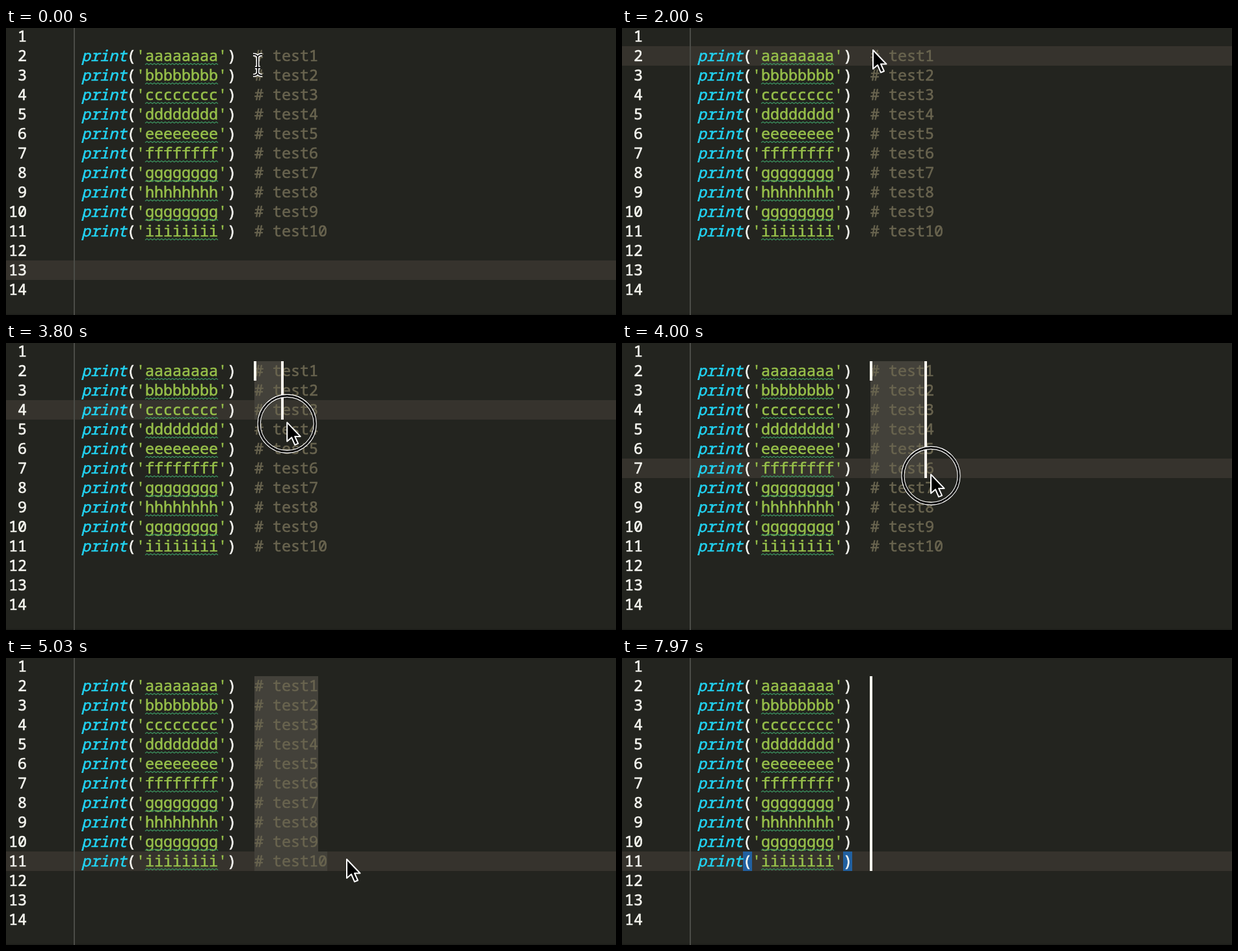
Animation of 938x442 px, one loop 8010 ms. Source, as an HTML page:

```html
<!DOCTYPE html>
<html>
<head>
<meta charset="utf-8">
<style>
  html, body { margin: 0; width: 100%; height: 100%; overflow: hidden; background: #23241f; }
  svg { display: block; width: 938px; height: 442px; }
  text {
    font: 23.333px "Noto Sans Mono", "DejaVu Sans Mono", monospace; white-space: pre;
    fill: currentColor; stroke: currentColor; stroke-width: 0.6;
  }
  .number, .paren { color: #f8f8f2; }
  .call { color: #22d3f2; font-style: italic; }
  .string { color: #97c04a; }
  .comment { color: #69644f; }
  .squiggle { fill: none; stroke: #3c9460; stroke-width: 1.1; }
</style>
</head>
<body>
<svg viewBox="0 0 938 442">
  <defs>
    <path id="beamShape" d="M-6 -12Q0 -12 1 -8Q2 -12 8 -12M1 -8V16M-6 20Q0 20 1 16Q2 20 8 20M-3 8H5"/>
  </defs>
  <rect width="938" height="442" fill="#23241f"/>
  <rect y="440" width="938" height="2" fill="#1e1f1b"/>
  <rect id="active" width="938" height="30" fill="#36332d"/>
  <path id="selection" fill="#43413a"/>
  <path id="brackets" d="M186 298h14v30h-14zM340 298h14v30h-14z" fill="#2160a0"/>
  <rect x="104" width="2" height="442" fill="#4b4c47"/>
  <g id="code"></g>
  <g id="comments"></g>
  <path id="carets" fill="#fcf7ee"/>
  <g id="ring" fill="none">
    <circle cy="3" r="43" stroke="#000" stroke-width="4"/>
    <circle cy="3" r="45" stroke="#fff" stroke-width="1.1"/>
    <circle cy="3" r="41" stroke="#fff" stroke-width="1.1"/>
  </g>
  <path id="arrow" d="M0 1V30L7 24L12 35.5L17 33.5L12 22.5H20.5Z" fill="#000" stroke="#fff" stroke-width="2" stroke-linejoin="round"/>
  <g id="beam" fill="none">
    <use href="#beamShape" stroke="#fff" stroke-width="5"/>
    <use href="#beamShape" stroke="#000" stroke-width="1.8"/>
  </g>
</svg>
<script>
const LOOP = 8010, CHAR = 14, ROW = 30, CODE_X = 116, COMMENT_X = 382;
const FIRST_ROW = 2, LAST_ROW = 11;
const CLICK = 500, CLICK_END = 950, ARROW_ON = 1500;
const PRESS = 3000, DRAG = 3400, DRAG_END = 4440, RELEASE = 4750;
const ARROW_OFF = 5300, ERASE = 5960;

const parts = Object.fromEntries(
  ['active', 'selection', 'brackets', 'code', 'comments', 'carets', 'ring', 'arrow', 'beam']
    .map(id => [id, document.getElementById(id)]));
const rowTop = row => row * ROW - 32;
const label = (kind, x, row, content) =>
  `<text class="${kind}" x="${x}" y="${rowTop(row) + 23}">${content}</text>`;
const box = (x, y, w, h) => `M${x} ${y}h${w}v${h}h${-w}z`;
const show = (part, on) => part.setAttribute('visibility', on ? 'visible' : 'hidden');
const clamp = (v, lo, hi) => Math.min(hi, Math.max(lo, v));

function buildText() {
  let code = '', comments = '';
  for (let row = 1; row <= 14; row++) {
    code += label('number', 32 - CHAR * String(row).length, row, row);
  }
  [...'abcdefghgi'].forEach((letter, i) => {
    const row = FIRST_ROW + i;
    code += label('call', CODE_X, row, 'print') +
      label('paren', CODE_X + 5 * CHAR, row, '(') +
      label('string', CODE_X + 6 * CHAR, row, `'${letter.repeat(8)}'`) +
      label('paren', CODE_X + 16 * CHAR, row, ')') +
      `<path class="squiggle" d="M214 ${rowTop(row) + 28.5}${'l2.8 -2l2.8 2'.repeat(20)}"/>`;
    comments += label('comment', COMMENT_X, row, `# test${i + 1}`);
  });
  parts.code.innerHTML = code;
  parts.comments.innerHTML = comments;
}

// Pointer stops: time, x, y
const stops = [
  [0, 386, 53], [300, 386, 33], [DRAG, 386, 33],
  [3800, 432, 121], [4230, 524, 293], [4400, 524, 309]
];
function pointerAt(t) {
  const next = stops.findIndex(s => s[0] > t);
  if (next < 0) return stops[stops.length - 1].slice(1);
  const a = stops[next - 1], b = stops[next], k = (t - a[0]) / (b[0] - a[0]);
  return [a[1] + (b[1] - a[1]) * k, a[2] + (b[2] - a[2]) * k];
}

// The selection trails the pointer slightly.
function selectionAt(t) {
  const [x, y] = pointerAt(t - 40);
  const row = clamp(Math.floor((y + 32) / ROW), FIRST_ROW, LAST_ROW);
  const column = Math.max(0, Math.round((x - COMMENT_X) / CHAR));
  return { row, column };
}

function caretVisible(t) {
  if (t < CLICK) return false;
  if (t >= DRAG && t < DRAG_END) return true;
  const start = t >= ERASE ? ERASE : t >= DRAG_END ? DRAG_END : CLICK;
  return (t - start) % 1000 < 500;
}

function draw(t) {
  const erased = t >= ERASE, dragging = t >= DRAG && !erased;
  let row = t < CLICK ? 13 : FIRST_ROW, selection = '';
  let carets = box(COMMENT_X - 1, rowTop(FIRST_ROW), 4, erased ? 300 : ROW);

  if (erased) row = LAST_ROW;
  if (dragging) {
    const end = selectionAt(t);
    row = end.row;
    for (let r = FIRST_ROW; r <= row; r++) {
      const width = CHAR * Math.min(end.column, r === LAST_ROW ? 8 : 7);
      selection += box(COMMENT_X, rowTop(r), width, ROW);
      carets += box(COMMENT_X + width - 1, rowTop(r), 4, ROW);
    }
  }

  parts.active.setAttribute('y', rowTop(row));
  parts.selection.setAttribute('d', selection);
  parts.carets.setAttribute('d', carets);
  show(parts.carets, caretVisible(t));
  show(parts.comments, !erased);
  show(parts.brackets, erased);

  const place = `translate(${pointerAt(t).join(' ')})`;
  const arrow = t >= ARROW_ON && t < ARROW_OFF;
  for (const name of ['ring', 'arrow', 'beam']) parts[name].setAttribute('transform', place);
  show(parts.ring, (t >= CLICK && t < CLICK_END) || (t >= PRESS && t < RELEASE));
  show(parts.arrow, arrow);
  show(parts.beam, !arrow && !erased);
}

function tick() {
  draw(performance.now() % LOOP);
  requestAnimationFrame(tick);
}

buildText();
tick();
</script>
</body>
</html>
```
